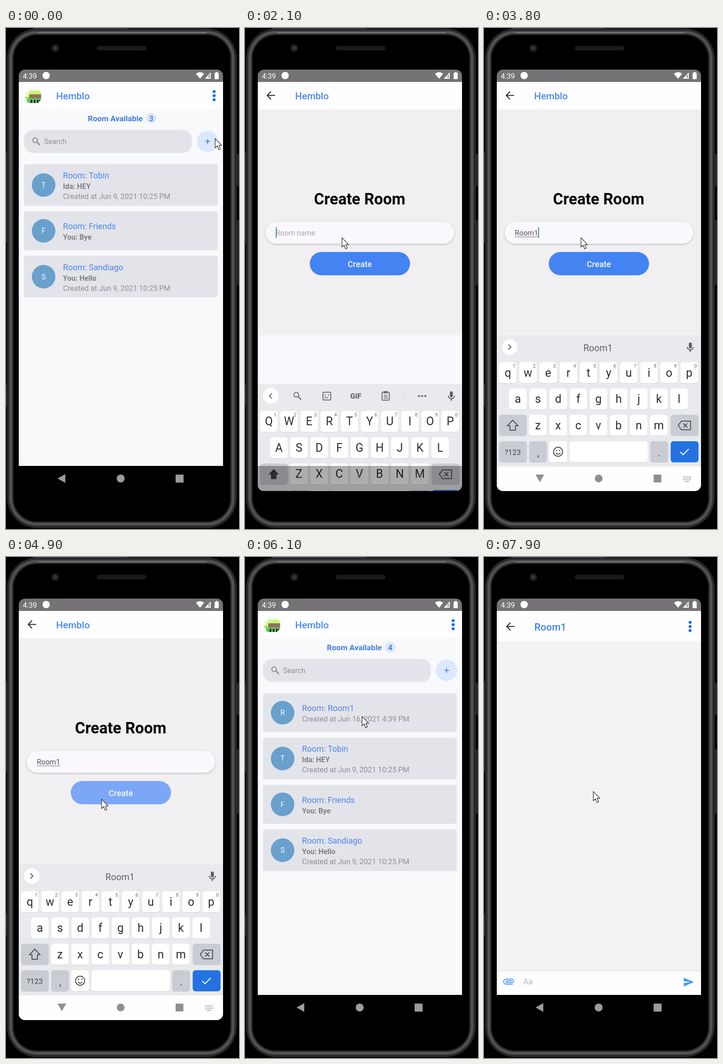
These frames come from a looping animation (511x1096 px, 8000 ms). An HTML page with a canvas:

```html
<!DOCTYPE html>
<html lang="en">
<head>
<meta charset="utf-8">
<title>Chat room demo</title>
<style>
html, body { margin: 0; width: 100%; height: 100%; overflow: hidden; background: #000; }
canvas { display: block; width: 511px; height: 1096px; }
</style>
</head>
<body>
<canvas id="stage"></canvas>
<script>
const W = 511, H = 1096, LOOP = 8000, STEP = 100;
const BLUE = '#4a87ec', APP = 'Hemblo';
const dpr = window.devicePixelRatio || 1;
const stage = document.getElementById('stage');
const sheet = document.createElement('canvas');
for (const cv of [stage, sheet]) {
  cv.width = W * dpr;
  cv.height = H * dpr;
  cv.getContext('2d').scale(dpr, dpr);
}
const main = stage.getContext('2d'), layer = sheet.getContext('2d');
let c = main;

// Drawing helpers
function rect(x, y, w, h, fill, r = 0) {
  c.fillStyle = fill;
  c.beginPath();
  c.roundRect(x, y, w, h, r);
  c.fill();
}
function frame(x, y, w, h, r, color, width) {
  c.strokeStyle = color;
  c.lineWidth = width;
  c.beginPath();
  c.roundRect(x, y, w, h, r);
  c.stroke();
}
function disc(x, y, r, fill) {
  c.fillStyle = fill;
  c.beginPath();
  c.arc(x, y, r, 0, 7);
  c.fill();
}
function ring(x, y, r, color, width) {
  c.strokeStyle = color;
  c.lineWidth = width;
  c.beginPath();
  c.arc(x, y, r, 0, 7);
  c.stroke();
}
function trace(points) {
  c.beginPath();
  for (let i = 0; i < points.length; i += 2) c.lineTo(points[i], points[i + 1]);
}
function poly(fill, ...points) {
  trace(points);
  c.closePath();
  c.fillStyle = fill;
  c.fill();
}
function line(color, width, ...points) {
  trace(points);
  c.strokeStyle = color;
  c.lineWidth = width;
  c.stroke();
}
function text(s, x, y, size, color, weight = 400, align = 'left') {
  c.font = `${weight} ${size}px Roboto, sans-serif`;
  c.textAlign = align;
  c.fillStyle = color;
  c.fillText(s, x, y);
}
function faded(alpha, draw) {
  c.save();
  c.globalAlpha *= alpha;
  draw();
  c.restore();
}
// Draws a whole screen apart, then blends it in as one picture
function blend(alpha, draw) {
  if (alpha <= 0) return;
  layer.clearRect(0, 0, W, H);
  const back = c;
  c = layer;
  draw();
  c = back;
  faded(Math.min(alpha, 1), () => c.drawImage(sheet, 0, 0, W, H));
}

// Keys are [time, ...values]; values are interpolated linearly
function track(t, keys) {
  let i = 0;
  while (i < keys.length - 1 && keys[i + 1][0] <= t) i++;
  const a = keys[i], b = keys[i + 1];
  if (!b || t < a[0]) return a.slice(1);
  const p = (t - a[0]) / (b[0] - a[0]);
  return a.slice(1).map((v, k) => v + (b[k + 1] - v) * p);
}

function drawPhone() {
  rect(0, 0, W, H, '#000');
  rect(60, 0, 206, 2, '#4b4b4d');
  rect(0, 272, 2, 198, '#2d2d2f');
  rect(0, 780, 2, 48, '#2d2d2f');
  rect(503, 275, 8, 71, '#27272a', 3);
  rect(503, 420, 8, 142, '#27272a', 3);
  rect(2.5, 1, 503.5, 1093, '#2a2a2c', 66);
  // Metal rim: brightest in the middle, soft towards both edges
  const rim = 12;
  for (let i = 0; i < rim; i++) {
    const v = Math.round(36 + 52 * Math.sin(Math.PI * i / rim) ** 2);
    const d = 4 + i;
    rect(d, d - 1, 508.5 - 2 * d, 1097 - 2 * d, `rgb(${v},${v},${v + 2})`, 67 - d);
  }
  rect(16.5, 15.5, 475.5, 1064, '#000', 51);
  line('#88888a', 1.5, 70, 10.5, 440, 10.5);
  disc(108, 44, 8.5, '#1d1d20');
  disc(108, 44, 4.5, '#34343a');
  rect(199, 39, 109, 10, '#1b1919', 5);
}

function drawStatus() {
  rect(28, 91, 448, 27, '#757376', [14, 14, 0, 0]);
  text('4:39', 37, 110.5, 16, '#fff');
  disc(88, 104, 8, '#fff');
  c.fillStyle = '#fff';
  c.beginPath();
  c.moveTo(425.5, 111);
  c.lineTo(416.5, 100);
  c.quadraticCurveTo(425.5, 93, 434.5, 100);
  c.fill();
  poly('#fff', 436, 111, 449, 97, 449, 111);
  poly('#98969a', 444, 104, 447, 101, 447, 109, 444, 109);
  rect(457.5, 98, 9, 14, '#fff', 1);
  rect(460, 96, 4, 3, '#fff');
}

function drawNav() {
  poly('#9b9b9b', 113, 985.5, 130, 976, 130, 995);
  disc(251.5, 985.5, 8.7, '#9b9b9b');
  rect(372, 977, 17.5, 17.5, '#9b9b9b', 1);
}

function menuDots(x, y) {
  for (const d of [-9, 0, 9]) disc(x, y + d, 3.3, '#156ff2');
}
function backArrow(x, y) {
  line('#222', 2, x + 18, y, x + 1, y);
  line('#222', 2, x + 9, y - 8.5, x + 0.8, y, x + 9, y + 8.5);
}
function magnifier(x, y, color) {
  ring(x - 2.5, y - 2.5, 5.2, color, 2);
  line(color, 2.6, x + 1.5, y + 1.5, x + 8, y + 8);
}

function drawAvatar() {
  c.save();
  c.beginPath();
  c.arc(59.5, 148.5, 18.5, 0, 7);
  c.clip();
  rect(41, 130, 38, 38, '#f8f7f5');
  rect(51, 137, 28, 9, '#c8fa6e');
  rect(46, 141, 6, 10, '#d4fb8c');
  rect(41, 150, 15, 5, '#a8f04c');
  rect(46, 154, 31, 10, '#62c860');
  rect(51, 145, 26, 9, '#94705f');
  for (const x of [54, 61, 68, 73]) rect(x, 157, 3.5, 7, '#17251c');
  c.restore();
}

function drawCard(room, y) {
  const tall = room.last && room.made;
  const h = tall ? 91 : 85.3, top = y + (tall ? 31 : 39);
  rect(39.5, y, 425, h, '#e3e3ea', 5);
  disc(82.5, y + h / 2, 25.8, '#69a0cc');
  text(room.name[0], 82.5, y + h / 2 + 5.5, 16, '#f4f8fc', 400, 'center');
  text('Room: ' + room.name, 125, top, 18.1, BLUE);
  if (room.last) text(room.last, 125, top + 23, 16, '#808083', 700);
  if (room.made) text('Created at ' + room.made, 125, top + (tall ? 45 : 23), 16.25, '#8f8f93');
  return h;
}

const ROOMS = [
  { name: 'Room1', made: 'Jun 16, 2021 4:39 PM' },
  { name: 'Tobin', last: 'Ida: HEY', made: 'Jun 9, 2021 10:25 PM' },
  { name: 'Friends', last: 'You: Bye' },
  { name: 'Sandiago', last: 'You: Hello', made: 'Jun 9, 2021 10:25 PM' }
];

function drawHome(t) {
  const rooms = t < 4000 ? ROOMS.slice(1) : ROOMS;
  rect(28, 118, 448, 840, '#f8f9fb');
  rect(28, 118, 448, 60, '#fefdff');
  drawAvatar();
  text(APP, 110, 156, 21, BLUE, 500);
  menuDots(456.5, 148);
  text('Room Available', 179.5, 204, 17.2, '#427fe6', 700);
  disc(318.5, 197.5, 11.5, '#dbe8fd');
  text(rooms.length, 318.5, 203.5, 16.5, '#3f75d2', 500, 'center');
  rect(39.5, 223, 368, 50.5, '#e3e3e9', 20);
  magnifier(66.5, 248, '#8b8b8f');
  text('Search', 83.5, 254, 16, '#929296');
  faded(t >= 500 && t < 700 ? 0.4 : 1, () => {
    disc(442, 248, 23.3, '#dbe8fd');
    line('#3f7be0', 1.7, 437, 248, 447.5, 248);
    line('#3f7be0', 1.7, 442.2, 243, 442.2, 253.5);
  });
  let y = 298;
  rooms.forEach((room, i) => {
    const pressed = t >= 7400 && i === 0;
    faded(pressed ? 0.4 : 1, () => { y += drawCard(room, y) + 12.1; });
  });
}

const TYPED = [[2800, 'R'], [3100, 'Ro'], [3400, 'Roo'], [3600, 'Room'], [3800, 'Room1']];
const typedAt = t => TYPED.reduce((s, [at, v]) => (t >= at ? v : s), '');

function caretOn(t) {
  if (t < 1900 || t >= 4800) return false;
  return t < 2500 || (t >= 2800 && t < 4300);
}

function drawCreate(t) {
  const typed = typedAt(t);
  rect(28, 118, 448, 840, '#f1eff2');
  rect(28, 118, 448, 60, '#fefdff');
  backArrow(48, 147.5);
  text(APP, 110, 156, 21, BLUE, 500);
  text('Create Room', 251.5, 385.5, 34.3, '#050505', 700, 'center');
  c.save();
  c.shadowColor = 'rgba(0,0,0,.22)';
  c.shadowBlur = 4 * dpr;
  c.shadowOffsetY = 1.5 * dpr;
  rect(45, 424, 414, 48, '#faf8fc', 24);
  c.restore();
  text(typed || 'Room name', 67.5, 454, 16, typed ? '#55555a' : '#aaa8ac');
  const end = 67.5 + (typed ? c.measureText(typed).width : 0);
  if (typed.length > 1) rect(67.5, 456.5, end - 67.5, 1, '#66666a');
  if (caretOn(t)) rect(end, 436, 2, 23, '#2c957d');
  const pressed = t >= 4800 && t < 5100;
  rect(142, 490, 220, 51, pressed ? '#7ca7f7' : '#4483f2', 25.5);
  text('Create', 251.8, 522.5, 18, '#f4f7ff', 500, 'center');
}

function key(x, y, w, fill) {
  rect(x, y + 1, w, 46, '#cfd1d5', 6);
  rect(x, y, w, 46, fill, 6);
}
function keyRow(letters, x, y) {
  [...letters].forEach((s, i) => {
    const mid = x + i * 44.2;
    key(mid - 19.3, y, 38.6, '#fff');
    text(s, mid, y + 31.5, 25, '#2b2c2e', 400, 'center');
  });
}

function drawMic() {
  const g = '#5a5c60';
  rect(449.3, 688, 6.4, 13, g, 3.2);
  c.strokeStyle = g;
  c.lineWidth = 2;
  c.beginPath();
  c.arc(452.5, 697.5, 6.8, 0, Math.PI);
  c.stroke();
  line(g, 2.2, 452.5, 704, 452.5, 709);
}

function drawTools() {
  const g = '#6a6c70';
  magnifier(115, 698, g);
  frame(171, 690, 17, 17, 2, g, 2);
  disc(176, 696, 1.4, g);
  disc(183, 696, 1.4, g);
  line(g, 1.8, 175, 700, 178, 702.5, 182, 701);
  text('GIF', 243, 704, 16, g, 900, 'center');
  frame(300.5, 690, 16, 17.5, 2, g, 2);
  rect(304, 687.5, 9, 5, g, 1);
  for (const y of [696, 699.5, 703]) rect(304, y, 9, 1.5, g);
  rect(348, 685, 1, 26, '#d3d5d8');
  for (const x of [381.5, 388.5, 395.5]) disc(x, 698.5, 2.3, g);
}

function drawHints(typed) {
  const hints = { Ro: ['Ro', 'Rob', 'Rock'], Roo: ['Roo', 'Room', 'Roof'], Room: ['Rooms', 'Room', 'Roomy'] }[typed];
  if (!hints) return text(typed, 250, 707, 20, '#606267', 400, 'center');
  hints.forEach((s, i) => text(s, 126 + i * 124, 707, 20, '#606267', 400, 'center'));
  for (const x of [188, 312]) rect(x, 686, 1, 25, '#d3d5d8');
}

function drawKeys(t) {
  const typed = typedAt(t), caps = !typed, open = typed.length < 2;
  const cased = s => (caps ? s : s.toLowerCase());
  const gray = '#c9ccd2', ink = '#505257';
  rect(28, 672, 448, 288, '#e8eaed');
  disc(56.5, 698, 17, '#fff');
  const tip = open ? 53.5 : 59;
  line(ink, 1.8, 56.3 * 2 - tip, 692.5, tip, 698, 56.3 * 2 - tip, 703.5);
  if (open) drawTools(); else drawHints(typed);
  drawMic();
  keyRow(cased('QWERTYUIOP'), 52.3, 731);
  [...'1234567890'].forEach((s, i) => text(s, 66 + i * 44.2, 743, 10.5, '#66686c', 400, 'center'));
  keyRow(cased('ASDFGHJKL'), 74.3, 788.5);
  keyRow(cased('ZXCVBNM'), 118.3, 846);
  key(33, 846, 61, gray);
  const arrow = [63, 858, 74.5, 870, 69, 870, 69, 880, 57, 880, 57, 870, 51.5, 870, 63, 858, 69, 864];
  if (caps) poly('#3d3f43', ...arrow.slice(0, 14));
  else line(ink, 2, ...arrow);
  key(409.5, 846, 61, gray);
  line(ink, 2, 426, 869.5, 433, 860, 453, 860, 453, 879, 433, 879, 426, 869.5, 429, 865);
  line(ink, 2, 437, 865, 446, 874);
  line(ink, 2, 446, 865, 437, 874);
  key(33, 904, 61, gray);
  text('?123', 63, 933.5, 16.5, '#45474b', 400, 'center');
  key(99, 904, 39, gray);
  text(',', 119, 937, 21, '#333', 400, 'center');
  key(143, 904, 39, '#fff');
  ring(162.5, 927, 10, ink, 2);
  disc(159, 924, 1.6, ink);
  disc(166, 924, 1.6, ink);
  c.beginPath();
  c.arc(162.5, 927, 5.2, 0.4, Math.PI - 0.4);
  c.stroke();
  key(187.5, 904, 171.5, '#fff');
  key(364.5, 904, 39, gray);
  text('.', 384, 937, 21, '#333', 400, 'center');
  key(409.5, 904, 61, '#2472e2');
  line('#fff', 2.2, 430.5, 927.5, 436.5, 933.5, 449, 921);
}

function drawKeyboardNav() {
  poly('#8f8f8f', 113, 977, 132, 977, 122.5, 993.5);
  disc(251.5, 985.5, 8.5, '#8f8f8f');
  rect(372, 977, 17, 17, '#8f8f8f', 1);
  for (let i = 0; i < 18; i++) rect(436.5 + (i % 6) * 3.1, 980.5 + Math.floor(i / 6) * 3.3, 1.8, 1.8, '#999');
  rect(440, 991, 10, 1.5, '#999');
}

function drawKeyboard(t) {
  if (t < 2000 || t >= 5300) return;
  const left = Math.max(0, 1 - (t - 1950) / 400);
  const drop = t < 5000 ? 341 * left ** 2.47 : 341 * ((t - 4950) / 350) ** 1.6;
  c.save();
  c.beginPath();
  c.roundRect(28, 672, 448, 341, [0, 0, 14, 14]);
  c.clip();
  rect(28, 672, 448, 341, '#faf8fc');
  c.translate(0, drop);
  drawKeys(t);
  if (drop < 10) rect(28, 959, 448, 80, '#fefeff');
  c.translate(0, -drop);
  if (drop > 10) {
    rect(28, 958, 448, 56, 'rgba(0,0,0,.32)');
    faded(0.2, drawNav);
  } else drawKeyboardNav();
  c.restore();
}

function drawChat() {
  rect(28, 118, 448, 840, '#f4f2f5');
  rect(28, 118, 448, 66, '#fefeff');
  backArrow(49, 152);
  text('Room1', 110.5, 160.5, 21.8, '#3f82f0', 500);
  menuDots(452, 152);
  rect(28, 905, 448, 53, '#fefeff');
  rect(28, 905, 448, 1, '#d5d3d7');
  const b = '#489bf4';
  c.strokeStyle = b;
  c.lineWidth = 2;
  c.beginPath();
  c.moveTo(63, 934.5);
  c.lineTo(48.5, 934.5);
  c.arc(48.5, 929, 5.5, Math.PI / 2, Math.PI * 1.5);
  c.lineTo(61, 923.5);
  c.arc(61, 927.3, 3.8, -Math.PI / 2, Math.PI / 2);
  c.lineTo(51, 931.1);
  c.arc(51, 929, 2.1, Math.PI / 2, Math.PI * 1.5);
  c.lineTo(61, 926.9);
  c.stroke();
  text('Aa', 86, 935, 17.5, '#b9b8bc');
  poly(b, 438, 920.5, 460.5, 930, 438, 939.5, 438, 932, 453, 930, 438, 928);
}

const POINTER = [
  [0, 458, 241], [400, 437, 246], [700, 437, 246], [1000, 390, 345], [1200, 348, 390],
  [1700, 212, 458], [4100, 212, 458], [4200, 325, 488], [4300, 262, 518], [4400, 211, 528],
  [4500, 211, 528], [4600, 209, 529], [5500, 209, 529], [6100, 256, 348], [7600, 256, 348],
  [7700, 251, 405], [7800, 243, 484], [7900, 239, 512]
];
function drawPointer(t) {
  const [x, y] = track(t, POINTER);
  c.save();
  c.translate(x + 0.7, y + 0.8);
  trace([0, 0, 0, 20.5, 4.7, 16.2, 8, 24.5, 11.6, 23, 8.2, 15, 14.5, 15]);
  c.closePath();
  c.fillStyle = '#fff';
  c.fill();
  c.strokeStyle = '#222';
  c.lineWidth = 1.2;
  c.lineJoin = 'round';
  c.stroke();
  c.restore();
}

const FORM = [[700, 0], [800, 0.25], [900, 0.65], [1000, 0.92], [1100, 1], [5500, 1], [5600, 0.7], [5700, 0.3], [5800, 0.08], [5900, 0]];
const CHAT = [[7600, 0], [7700, 0.4], [7800, 0.85], [7900, 1]];

function draw(t) {
  drawPhone();
  drawStatus();
  drawNav();
  const form = track(t, FORM)[0];
  if (form < 1) drawHome(t);
  blend(form, () => drawCreate(t));
  drawKeyboard(t);
  blend(track(t, CHAT)[0], drawChat);
  drawPointer(t);
}

const start = performance.now();
function tick() {
  const t = (performance.now() - start) % LOOP;
  draw(Math.floor(t / STEP) * STEP);
  requestAnimationFrame(tick);
}
tick();
</script>
</body>
</html>
```
